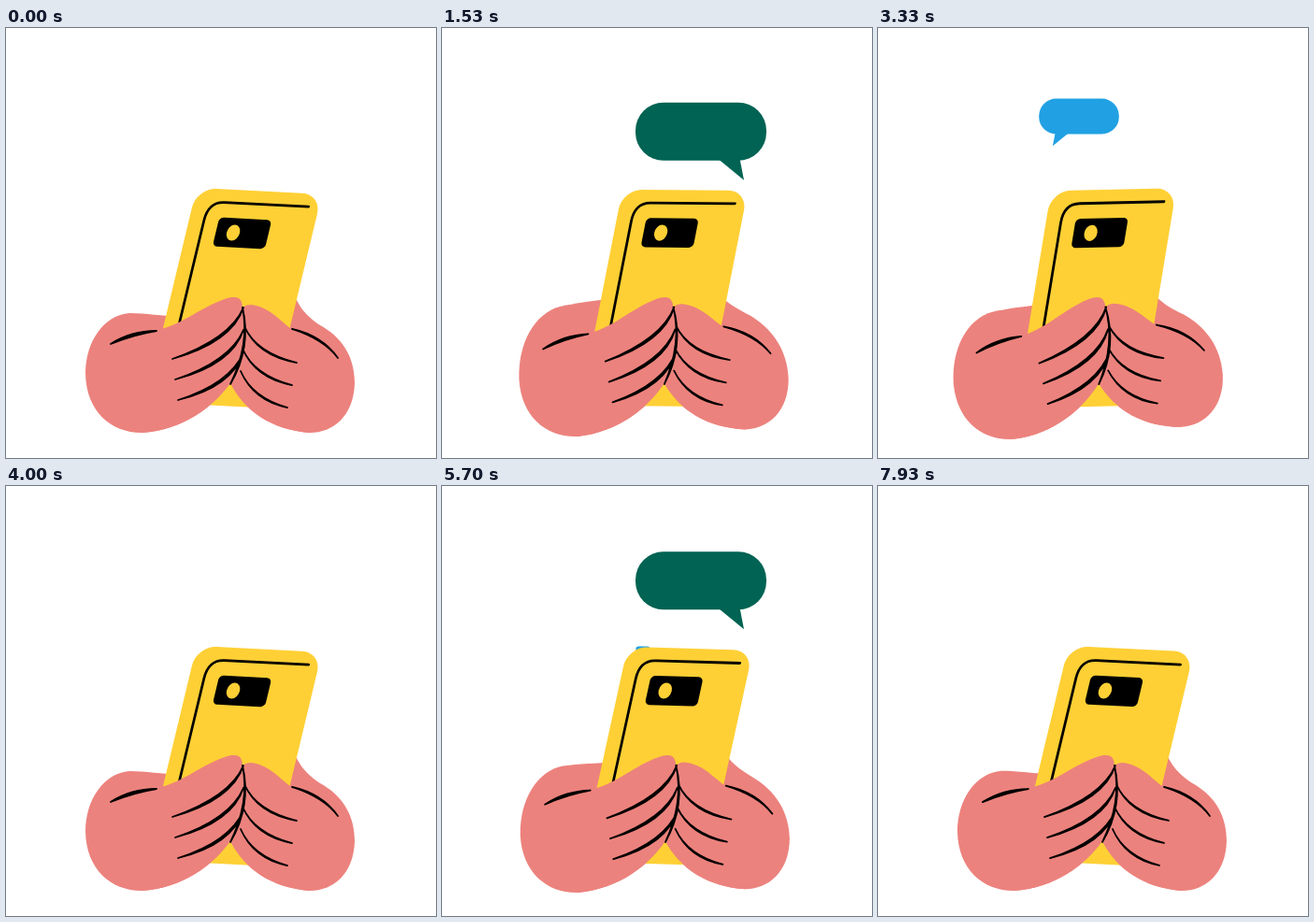
These frames come from a looping animation (460x460 px, 8010 ms). An HTML page:

```html
<!DOCTYPE html>
<html lang="en">
<head>
<meta charset="utf-8">
<title>Texting hands</title>
<style>
html, body { margin: 0; width: 100%; height: 100%; overflow: hidden; background: #fff; }
svg { display: block; width: 100vw; height: 100vh; }
.skin { fill: #ec827d; }
.case { fill: #ffd035; }
#lines { stroke: #000; stroke-width: 1.8; stroke-linejoin: round; }
</style>
</head>
<body>
<svg viewBox="0 0 460 460">
  <defs>
    <g id="bubble">
      <rect x="-70" y="-31" width="140" height="62" rx="30"/>
      <path d="M18 29L46 52L41 26Z"/>
    </g>
  </defs>
  <use id="green" href="#bubble" fill="#006353"/>
  <use id="blue" href="#bubble" fill="#21a1e3"/>
  <g id="sway">
    <path id="palmL" class="skin"/>
    <path id="palmR" class="skin"/>
    <g transform="matrix(1 .05 -.24 1 204 171)">
      <rect class="case" width="134" height="229" rx="21"/>
      <path d="M16 145V34Q16 14 33 14H123" fill="none" stroke="#000" stroke-width="2.8" stroke-linecap="round"/>
      <rect x="31.5" y="30" width="56" height="31" rx="5"/>
      <ellipse class="case" cx="50" cy="45.5" rx="7" ry="8.5"/>
    </g>
    <path class="skin" d="M166 322C190 316 208 299 234 290C249 285 253 290 253 300C258 330 254 355 240 380C222 405 190 430 145 433L130 380Z"/>
    <path class="skin" d="M305 322C290 310 280 298 262 296Q253 296 253 302C258 330 254 355 240 380C255 410 285 430 325 433L345 390Z"/>
    <path id="lines"/>
  </g>
</svg>
<script>
const $ = id => document.getElementById(id);
const clamp = (v, lo, hi) => Math.min(hi, Math.max(lo, v));
const ease = x => (1 - Math.cos(Math.PI * clamp(x, 0, 1))) / 2;

// Brush stroke from a to c, bent towards b and thin at both ends
const brush = (ax, ay, bx, by, cx, cy) =>
  `M${ax} ${ay}Q${bx} ${by} ${cx} ${cy}Q${bx + 2} ${by + 4} ${ax} ${ay}Z`;

function inkLines() {
  let d = brush(253, 299, 261, 338, 240, 381)   // seam between the hands
    + brush(112, 338, 134, 324, 161, 324)       // backs of the hands
    + brush(306, 322, 338, 329, 355, 353);
  for (let i = 0; i < 3; i++) {                 // gaps between fingers
    const y = 299 + 24 * i;
    d += brush(254, y, 240, y + 33, 178 + 3 * i, y + 55 - 2 * i)
      + brush(255 - 2 * i, y + 20, 267 - 2 * i, y + 48, 311 - 5 * i, y + 59);
  }
  return d;
}
$('lines').setAttribute('d', inkLines());

// The hands sway as one while the wrists swell in mid swing
function drawHands(step) {
  const a = Math.PI * step / 20, s = Math.sin(a) ** 2;
  $('sway').setAttribute('transform', `rotate(${-2.85 * (1 - Math.cos(a))} 240 433)`);
  $('palmL').setAttribute('d',
    `M190 ${309 - 22 * s}C165 ${308 - 20 * s} 150 ${305 - 15 * s} 132 ${305 - 12 * s}` +
    `C105 ${307 - 8 * s} 85 ${335 - 5 * s} 85 370C86 410 112 433 145 433C190 430 222 405 240 380V330Z`);
  $('palmR').setAttribute('d',
    `M306 ${280 + 12 * s}C313 298 320 ${307 - 4 * s} 336 ${318 - 6 * s}` +
    `C358 ${330 - 3 * s} 373 350 373 380C372 415 350 433 325 433C285 430 255 410 240 380V330Z`);
}

// A bubble grows, floats up along a sine to its top and shrinks away
function drawBubble(k, { id, x, y, rise, mid, span, grow, shrink, top, flip = 1 }) {
  const scale = ease((k - grow) / 14) * (1 - ease((k - shrink) / 14));
  const phase = clamp(Math.PI * (k - mid) / span, -Math.PI / 2, Math.PI / 2);
  const cy = Math.max(top, y - rise * Math.sin(phase));
  $(id).setAttribute('transform', `translate(${x} ${cy}) scale(${flip * scale} ${scale})`);
}

const bubbles = [
  { id: 'green', x: 277, y: 101.3, rise: 85, mid: 34, span: 84, grow: 1, shrink: 52, top: 43.5 },
  { id: 'blue', x: 215, y: 136, rise: 42, mid: 49, span: 40, grow: 31, shrink: 61, top: 94, flip: -1 }
];

function draw(now) {
  const t = now % 8010;
  // Steps alternate between 30 and 70 ms
  const step = Math.min(159, Math.floor(t / 100) * 2 + (t % 100 >= 30));
  drawHands(step);
  bubbles.forEach(b => drawBubble(step % 80, b));
}

const start = performance.now();
function loop() {
  draw(performance.now() - start);
  requestAnimationFrame(loop);
}
loop();
</script>
</body>
</html>
```
